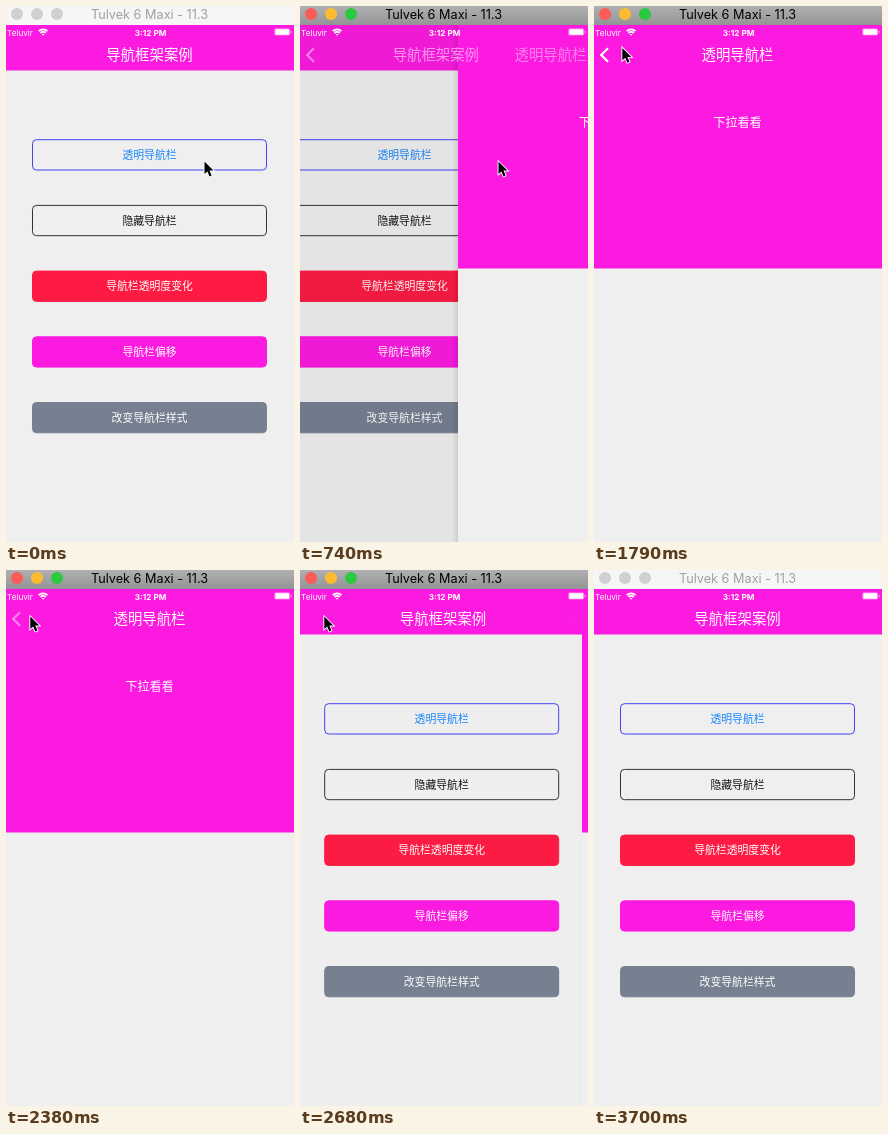
An HTML page for the animation above (3.8 s loop, 288x536 px).

```html
<!DOCTYPE html>
<html lang="zh-CN">
<head>
<meta charset="utf-8">
<style>
html, body { margin: 0; width: 100%; height: 100%; overflow: hidden; background: #efefef }
svg { display: block }
text { font-family: "Noto Sans CJK SC", "Noto Sans CJK", sans-serif; text-anchor: middle }
.nav { font-size: 14.4px; fill: #fff }
.row { font-size: 10.85px }
.latin { font-family: Inter, sans-serif; font-size: 12.7px }
.status { font-family: Inter, sans-serif; font-size: 8.2px; fill: #fff }
</style>
</head>
<body>
<svg width="288" height="536" viewBox="0 0 288 536">
  <defs>
    <linearGradient id="chrome" x2="0" y2="1">
      <stop stop-color="#b0b0b2"/><stop offset="1" stop-color="#949496"/>
    </linearGradient>
    <linearGradient id="shade">
      <stop stop-opacity="0"/><stop offset="1" stop-opacity=".1"/>
    </linearGradient>
  </defs>

  <rect width="288" height="536" fill="#efefef"/>
  <rect y="19" width="288" height="45.5" fill="#fc1ae0"/>
  <g id="list"></g>
  <rect id="dim" width="288" height="536"/>

  <g id="detail">
    <rect id="edge" x="-6" width="6" height="536" fill="url(#shade)"/>
    <rect y="19" width="288" height="517" fill="#efefef"/>
    <rect y="19" width="288" height="243.5" fill="#fc1ae0"/>
    <text id="hint" y="121.2" font-size="12.1" fill="#fff">下拉看看</text>
  </g>

  <text id="homeTitle" class="nav" x="143.5" y="53.8">导航框架案例</text>
  <text id="detailTitle" class="nav" x="143.5" y="53.8">透明导航栏</text>
  <path id="back" d="M14 42.3 7.2 49 14 55.7" fill="none" stroke="#fff" stroke-width="2.2"/>

  <text class="status" x="1" y="29.6" style="text-anchor:start">Teluvir</text>
  <g fill="none" stroke="#fff" stroke-width="1.8">
    <path d="M32.7 25.2a6.3 6.3 0 0 1 8.8 0M34.5 27a3.7 3.7 0 0 1 5.2 0"/>
    <path d="M35.7 28h2.8l-1.4 1.7z" fill="#fff" stroke="none"/>
  </g>
  <text class="status" x="144.6" y="29.6" font-weight="700">3:12 PM</text>
  <rect x="268.2" y="22.3" width="16" height="7.3" rx="1.6" fill="#fff" fill-opacity=".4"/>
  <rect x="269.3" y="23.2" width="13.9" height="5.6" rx=".8" fill="#fff"/>
  <rect x="284.8" y="24.8" width="1" height="2.6" rx=".5" fill="#fff" fill-opacity=".5"/>

  <rect id="bar" width="288" height="19"/>
  <g id="lights"></g>
  <text id="caption" class="latin" x="143.5" y="13">Tulvek 6 Maxi - 11.3</text>

  <path id="cursor" d="M0 0V12.4L2.9 9.9 5 14.8 7.1 13.9 5 9H9z" stroke="#fff" stroke-width="1.8" paint-order="stroke"/>
</svg>
<script>
const LOOP = 3800, W = 288, WAKE = 590, SLEEP = 3700, STEP = 148.6;
const $ = id => document.getElementById(id);
const set = (id, attrs) => { for (const k in attrs) $(id).setAttribute(k, attrs[k]); };

// Critically damped spring: the share of the way still to go.
const rest = u => (1 + u) * Math.exp(-u);
const phase = (now, start, rate) => Math.max(0, now - start) * rate;

// home, title: how far each title travels; top: where the dimming begins
const push = { start: 675, home: 17, title: 195, top: 19 };
const pop = { start: 2433, home: 23, title: 159, top: 64.5 };

// label, text colour, fill, border
const rows = [
  ['透明导航栏', '#1a86fb', 'none', '#4343f4'],
  ['隐藏导航栏', '#111', 'none', '#333'],
  ['导航栏透明度变化', '#fff', '#fd1b43', '#fd1b43'],
  ['导航栏偏移', '#fff', '#fc1ae0', '#fc1ae0'],
  ['改变导航栏样式', '#fff', '#768091', '#768091']
];
$('list').innerHTML = rows.map(([label, ink, fill, border], i) => {
  const y = 133.7 + 65.7 * i;
  return `<rect x="26.5" y="${y}" width="234" height="30.3" rx="4" fill="${fill}" stroke="${border}"/>
    <text class="row" x="143.5" y="${y + 19.1}" fill="${ink}">${label}</text>`;
}).join('');

const lit = ['#fc5b56', '#fdbc2f', '#2ac940'];
$('lights').innerHTML = lit.map((_, i) => `<circle cx="${11 + 20 * i}" cy="8" r="6"/>`).join('');
const lights = [...$('lights').children];

function drawSlide(now) {
  const pushing = now < pop.start;
  const move = pushing ? push : pop;
  const left = rest(phase(now, move.start, .024));
  const edge = Math.round(W * (pushing ? left : 1 - left));
  const away = edge / W, cover = 1 - away;
  const pressed = now > 2370;

  set('list', { transform: `translate(${-.3 * W * cover})` });
  set('dim', { y: move.top, opacity: .1 * cover });
  set('detail', { transform: `translate(${edge})`, visibility: cover ? 'visible' : 'hidden' });
  set('edge', { y: move.top, opacity: Math.min(1, cover * 5) });
  set('hint', { x: now < 1180 ? 145 : 143.5 });
  set('homeTitle', { transform: `translate(${-move.home * cover})`, opacity: away });
  set('detailTitle', { transform: `translate(${move.title * away})`, opacity: cover });
  set('back', { opacity: cover * (pressed ? .45 : 1) });
}

function drawCursor(now) {
  const u = phase(now, 1425, .016);
  const x = 24.3 + 174.2 * rest(u);
  const y = 46.6 + 109 * rest(u) - 65 * u * u * Math.exp(-u); // hooks above its goal
  set('cursor', { transform: `translate(${x} ${y})`, visibility: now < 2800 ? 'visible' : 'hidden' });
}

function drawWindow(active) {
  set('bar', { fill: active ? 'url(#chrome)' : '#f6f6f6' });
  set('caption', { fill: active ? '#000' : '#a0a0a0' });
  lights.forEach((c, i) => c.setAttribute('fill', active ? lit[i] : '#d0d0d0'));
}

function draw() {
  const t = performance.now() % LOOP;
  const now = WAKE + STEP * Math.max(0, Math.floor((t - WAKE) / STEP));
  drawSlide(now);
  drawCursor(now);
  drawWindow(t >= WAKE && t < SLEEP);
  requestAnimationFrame(draw);
}
draw();
</script>
</body>
</html>
```
